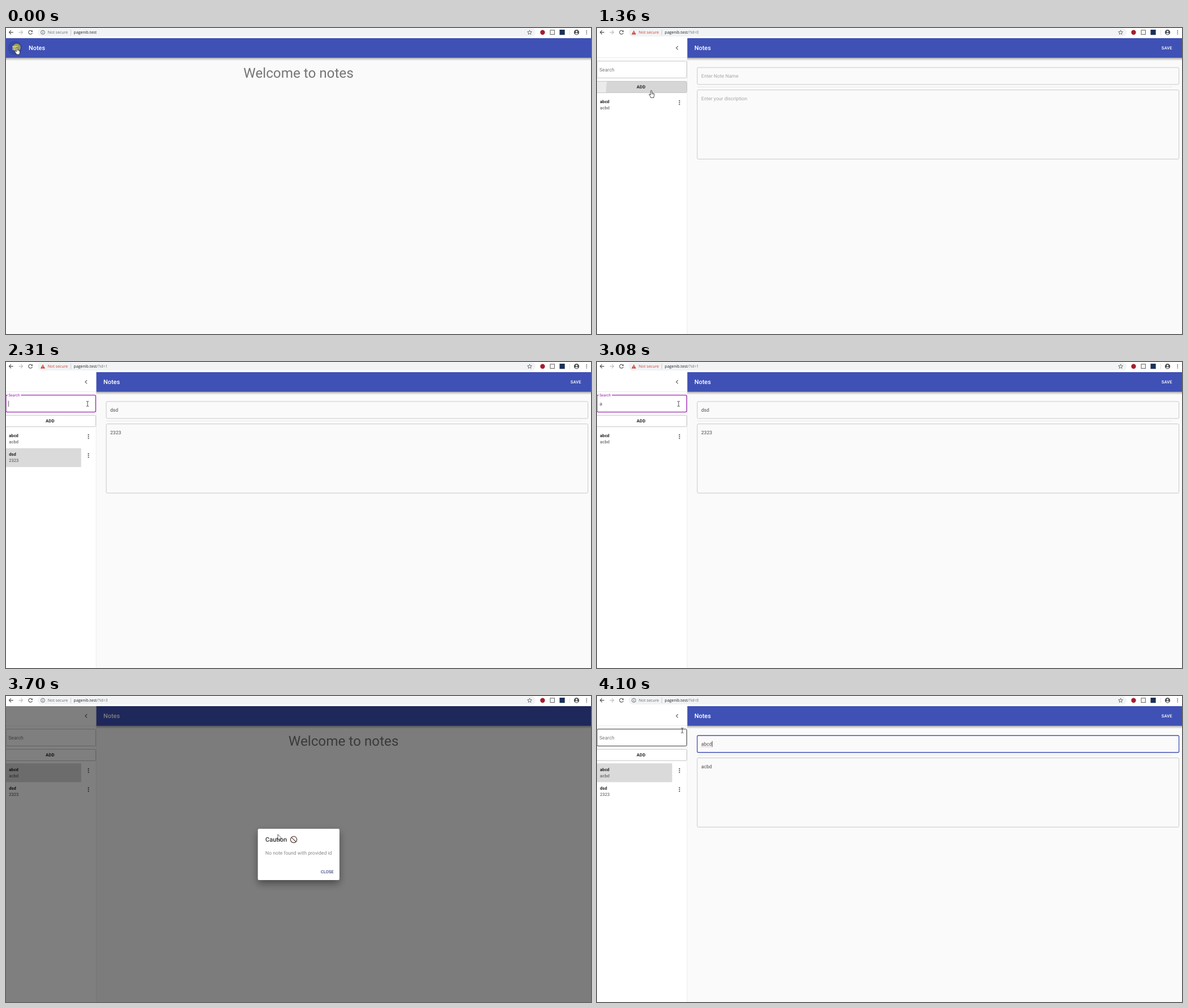
An HTML page for the animation above (4.25 s loop, 1033 by 542 pixels).

```html
<!DOCTYPE html>
<html lang="en">
<head>
<meta charset="utf-8">
<title>Notes</title>
<style>
html, body { margin: 0; width: 100%; height: 100%; overflow: hidden; background: #fafafa; }
svg { display: block; width: 1033px; height: 542px; font-family: Roboto, Arial, sans-serif; text-rendering: geometricPrecision; }
.ui { font-family: "Open Sans", "Noto Sans", sans-serif; }
</style>
</head>
<body>
<svg id="stage" viewBox="0 0 1033 542"></svg>
<script>
const LOOP = 4250;
const HOST = 'pagenib.test';
const BODY = 8.65;
const stage = document.getElementById('stage');
const pen = document.createElement('canvas').getContext('2d');

const hand = (x, y) => ({ kind: 'hand', x, y });
const beam = (x, y) => ({ kind: 'beam', x, y });
const arrow = (x, y) => ({ kind: 'arrow', x, y });

const abcd = ['abcd', 'acbd'];
const dsd = ['dsd', '2323'];
const open = { drawer: 1, titleX: 172, welcomeX: 596 };
const closed = { drawer: 0, titleX: 40, welcomeX: 516.5 };
const blank = { form: true, name: '', desc: '', focus: '', sel: -1 };

const initial = {
  ...closed, form: false, name: '', desc: '', focus: '', red: false, path: '',
  notes: [], sel: -1, query: '', searchHover: false, cursor: hand(19.5, 34.5),
  tap: true, addHover: false, addRipple: 0, dialog: 0, closeHover: false,
  closeRipple: 0, loading: false, caret: true, spell: false
};

// Each step changes only what differs from the step before.
const steps = [
  [0, {}],
  [70, { drawer: 0.6, titleX: 100, welcomeX: 560, tap: false }],
  [150, { ...open, cursor: arrow(35, 58) }],
  [230, { cursor: arrow(72, 90) }],
  [310, { cursor: hand(96, 111), addHover: true }],
  [380, { ...blank, addRipple: 60 }],
  [460, { cursor: beam(240, 92), addHover: false, addRipple: 0 }],
  [540, { focus: 'name' }],
  [630, { name: 'a', red: true }],
  [710, { name: 'abc' }],
  [790, { name: 'abcd', cursor: beam(260, 140) }],
  [870, { focus: 'desc', desc: 'ac' }],
  [950, { desc: 'acbd', cursor: hand(1006, 34) }],
  [1030, { path: '/?id=0', notes: [abcd], sel: 0, focus: '' }],
  [1110, { cursor: arrow(330, 140) }],
  [1200, { cursor: hand(96, 111), addHover: true }],
  [1280, { ...blank, addRipple: 42 }],
  [1360, { addRipple: 80 }],
  [1450, { cursor: beam(240, 88), addHover: false, addRipple: 0 }],
  [1530, { focus: 'name' }],
  [1680, { name: 'd' }],
  [1760, { name: 'dsd', cursor: beam(250, 135) }],
  [1840, { focus: 'desc', desc: '2' }],
  [1910, { desc: '2323' }],
  [1990, { cursor: hand(1006, 34) }],
  [2070, { path: '/?id=1', notes: [abcd, dsd], sel: 1, focus: '' }],
  [2140, { cursor: arrow(330, 120) }],
  [2220, { cursor: beam(144, 74), searchHover: true }],
  [2310, { focus: 'search', searchHover: false }],
  [2390, { caret: false }],
  [2470, { caret: true }],
  [2640, { query: 'd' }],
  [2720, { query: 'ds' }],
  [2790, { query: 'dsd' }],
  [2860, { query: 'ds' }],
  [2930, { query: 'd' }],
  [3080, { query: 'a', caret: false }],
  [3250, { cursor: beam(218.5, 11), focus: '' }],
  [3320, { path: '/?id=3' }],
  [3400, { ...closed, form: false, query: '', red: false, loading: true, sel: 0 }],
  [3480, { drawer: 0.774, titleX: 114, welcomeX: 568.5, dialog: 0.7 }],
  [3560, { ...open, dialog: 1, loading: false }],
  [3630, { cursor: arrow(330, 120) }],
  [3700, { cursor: arrow(480, 245) }],
  [3770, { cursor: hand(565, 312), closeHover: true }],
  [3860, { closeRipple: 4 }],
  [3950, { path: '/?id=0', form: true, name: 'abcd', desc: 'acbd', focus: 'name',
           caret: true, spell: true, dialog: 0.52, closeRipple: 8 }],
  [4040, { dialog: 0, cursor: arrow(310, 170) }],
  [4100, { cursor: beam(150.5, 61), searchHover: true }]
];

let last = initial;
const scenes = steps.map(([at, change]) => ({ at, state: last = { ...last, ...change } }));

const text = (x, y, size, fill, str, extra = '') =>
  `<text x="${x}" y="${y}" font-size="${size}" fill="${fill}" ${extra}>${str}</text>`;
const rect = (x, y, w, h, fill, extra = '') =>
  `<rect x="${x}" y="${y}" width="${w}" height="${h}" fill="${fill}" ${extra}/>`;
const circle = (x, y, r, fill, extra = '') =>
  `<circle cx="${x}" cy="${y}" r="${r}" fill="${fill}" ${extra}/>`;
const path = (d, stroke, width = 1, fill = 'none', extra = '') =>
  `<path d="${d}" stroke="${stroke}" stroke-width="${width}" fill="${fill}" ${extra}/>`;
const dots = (x, y, gap, r, fill) =>
  [-gap, 0, gap].map(dy => circle(x, y + dy, r, fill)).join('');
const medium = 'font-weight="500"';
const bold = 'font-weight="700"';
const middle = 'text-anchor="middle"';

function textWidth(str) {
  pen.font = `${BODY * 10}px Roboto, Arial, sans-serif`;
  return pen.measureText(str).width / 10;
}

const caretAt = (x, y) => rect(x, y - 8.6, 0.7, 10.6, '#222');

function toolbar(s) {
  const ink = '#4d5156';
  const secure = s.red
    ? path('M65 4.2L69 11.4H61Z', 'none', 0, '#d23f31') + rect(64.6, 6.6, 0.8, 2.4, '#fff') + rect(64.6, 9.7, 0.8, 0.8, '#fff')
    : circle(65, 7.7, 3.5, 'none', `stroke="${ink}" stroke-width=".8"`) + rect(64.6, 7.1, 0.8, 2.6, ink) + rect(64.6, 5.5, 0.8, 0.9, ink);
  return `<g class="ui">` +
    rect(0, 0, 1033, 18, '#fff') +
    rect(56, 0.5, 879, 14.5, '#f1f3f4', 'rx="7.2"') +
    path('M12.7 7.6H5.6M8.9 4.2L5.5 7.6L8.9 11', ink, 1.1) +
    path('M22.4 7.6H29.5M26.2 4.2L29.6 7.6L26.2 11', '#bcbfc2', 1.1) +
    path('M46 5.6A3.4 3.4 0 1 0 46.5 8.6', ink, 1.1) +
    path('M46.9 3.9V7H43.8Z', 'none', 0, ink) +
    secure +
    text(73.8, 10.2, 7, s.red ? '#d23f31' : '#666a6e', 'Not secure') +
    rect(114, 3, 0.7, 9.5, '#b5b8bb') +
    text(119.6, 10.2, 7, '#202124', `${HOST}<tspan fill="#6b6f73">${s.path}</tspan>`) +
    path('M924.6 3.9L925.7 6.5L928.5 6.7L926.4 8.5L927 11.2L924.6 9.8L922.2 11.2L922.8 8.5L920.7 6.7L923.5 6.5Z', ink, 0.8) +
    circle(947.5, 7.7, 4.2, '#a51d2d') +
    rect(961, 3.8, 7.6, 7.6, '#f4f4f4', 'stroke="#555" stroke-width=".9"') +
    rect(977.5, 3, 9.2, 9.2, s.loading ? '#e8e9ea' : '#1b3157') +
    rect(995, 3, 0.7, 9.5, '#d0d3d6') +
    circle(1007.5, 7.7, 4.7, ink) + circle(1007.5, 6.2, 1.5, '#fff') +
    path('M1004.7 10.3Q1007.5 7.4 1010.3 10.3Q1007.5 12.6 1004.7 10.3Z', 'none', 0, '#fff') +
    dots(1025.2, 7.7, 2.8, 0.85, ink) + '</g>';
}

function header(s) {
  let out = rect(0, 50, 1033, 8, 'url(#shade)') + rect(0, 17.5, 1033, 35.2, '#3f51b5');
  if (!s.drawer) {
    if (s.tap) out += circle(16, 35.3, 12.5, 'rgba(0,0,0,.1)');
    out += path('M11.2 32.6H20.8M11.2 35.3H20.8M11.2 38H20.8', '#fff', 1.1);
    if (s.tap) out += circle(19, 34.5, 6.8, 'rgba(225,220,40,.6)');
  }
  out += text(s.titleX, 39.1, 10.9, '#fff', 'Notes', medium);
  if (s.form) out += text(996.8, 37.9, 7.53, '#fff', 'SAVE', `${medium} letter-spacing=".1"`);
  return out;
}

function field(y, h, value, hint, focused, s) {
  const base = y + 18.3;
  let out = rect(177, y, 850.6, h, 'none', focused
    ? 'rx="2" stroke="#3f51b5" stroke-width="1.3"'
    : 'rx="2" stroke="#c3c3c3" stroke-width=".9"');
  out += text(184, base, BODY, value ? '#4a4a4a' : '#a6a6a6', value || hint);
  if (focused) {
    if (s.spell) out += path(`M184 ${base + 1.6}h${textWidth(value)}`, '#b66', 0.7, 'none', 'stroke-dasharray="1 .7"');
    out += caretAt(184.2 + textWidth(value), base);
  }
  return out;
}

function content(s) {
  if (!s.form) return text(s.welcomeX, 87.6, 24.22, '#757575', 'Welcome to notes', middle);
  return field(70, 30, s.name, 'Enter Note Name', s.focus === 'name', s) +
    rect(177, 104.2, 838, 0.7, '#e3e3e3') +
    field(109.7, 122.5, s.desc, 'Enter your discription', s.focus === 'desc', s);
}

function searchBox(s) {
  const on = s.focus === 'search';
  const raised = on || s.query;
  const stroke = on ? '#9c27b0' : s.searchHover ? '#222' : '#c0c0c0';
  let out = rect(0, 58.6, 158.4, 30, '#fff', `rx="2" stroke="${stroke}" stroke-width="${on ? 1.3 : 0.9}"`);
  if (raised) {
    out += rect(2.8, 57, 23.6, 3.4, '#fff') +
      text(4.2, 61.2, 6.6, on ? '#9c27b0' : '#757575', 'Search') +
      text(4.4, 77, BODY, '#4a4a4a', s.query);
    if (on && s.caret) out += caretAt(4.4 + textWidth(s.query), 77.2);
  } else out += text(4.2, 76.5, BODY, '#7b7b7b', 'Search');
  return out;
}

function addButton(s) {
  return rect(-1, 94.4, 159.5, 20.2, s.addHover ? '#ebebeb' : '#fff', 'rx="2"') +
    `<g clip-path="url(#addClip)">${circle(96, 111, s.addRipple, '#d6d6d6')}</g>` +
    rect(-1, 94.4, 159.5, 20.2, 'none', 'rx="2" stroke="#c0c0c0" stroke-width=".9"') +
    text(77.8, 107.2, 7.7, '#222', 'ADD', `${bold} ${middle} letter-spacing=".15"`);
}

function noteRow([title, body], i, selected) {
  const y = 119.2 + i * 33.5;
  return (selected ? rect(0, y, 132.7, 33.4, '#dadada') : '') +
    text(5.3, y + 13.6, 7.6, '#222', title, bold) +
    text(5.3, y + 24.3, 7.6, '#4a4a4a', body) +
    dots(145.6, y + 12.9, 3.2, 1.15, '#5a5a5a');
}

function drawer(s) {
  if (!s.drawer) return '';
  const rows = s.notes.filter(n => n[0].startsWith(s.query));
  return `<g transform="translate(${-159.3 * (1 - s.drawer)} 0)">` +
    rect(0, 17.5, 159.3, 525, '#fff') + rect(158.8, 17.5, 0.6, 525, '#dedede') +
    rect(0, 52, 158.8, 0.7, '#e4e4e4') +
    path('M143 32.2L139.9 35.3L143 38.4', '#555', 1.1) +
    searchBox(s) + addButton(s) +
    rows.map((n, i) => noteRow(n, i, !s.query && i === s.sel)).join('') + '</g>';
}

function dialog(s) {
  if (!s.dialog) return '';
  return rect(0, 17.5, 1033, 525, '#000', `opacity="${s.dialog / 2}"`) +
    `<g opacity="${s.dialog}">` +
    rect(444.8, 235.2, 144, 90.8, '#fff', 'rx="2" filter="url(#lift)"') +
    text(458, 258.3, 11, '#333', 'Caution', medium) +
    circle(508, 254.3, 5.6, 'none', 'stroke="#59463d" stroke-width="1.3"') +
    path('M504.1 250.4L511.9 258.2', '#59463d', 1.2) +
    text(458, 281.2, BODY, '#868686', 'No note found with provided id') +
    (s.closeHover ? rect(549.5, 302, 35.5, 18.5, 'rgba(63,81,181,.1)', 'rx="2"') : '') +
    circle(564, 312, s.closeRipple, 'rgba(63,81,181,.28)') +
    text(555.8, 314.1, 7.53, '#3c4a7e', 'CLOSE', medium) + '</g>';
}

const shapes = {
  hand: path('M-1.2 .8Q-1.2 -.3 -.1 -.3Q1 -.3 1 .8V4.3Q2 3.7 2.6 4.7Q3.6 4.2 4 5.2Q5 4.9 5 6.2V8.6Q5 10 4.2 11V12.4H-1.2V11.2Q-3 9 -4 7Q-4.2 5.8 -3 6.1L-1.2 7.6Z', '#222', 0.8, '#fff') +
    path('M1 4.3V6.6M2.6 4.8V6.8M4 5.3V7', '#222', 0.5),
  beam: path('M-2.2 -4.4Q0 -4.6 0 -3.6Q0 -4.6 2.2 -4.4M0 -3.8V3.8M-2.2 4.4Q0 4.6 0 3.6Q0 4.6 2.2 4.4', '#222', 0.8),
  arrow: path('M0 0V10L2.3 7.9L3.9 11.4L5.3 10.8L3.8 7.4H7Z', '#222', 0.7, '#fff')
};

const defs = `<defs>
  <linearGradient id="shade" x1="0" y1="0" x2="0" y2="1">
    <stop offset=".3" stop-color="#000" stop-opacity=".32"/><stop offset="1" stop-color="#000" stop-opacity="0"/>
  </linearGradient>
  <clipPath id="addClip"><rect x="-1" y="94.4" width="159.5" height="20.2" rx="2"/></clipPath>
  <filter id="lift" x="-30%" y="-40%" width="160%" height="190%">
    <feDropShadow dx="0" dy="6" stdDeviation="7" flood-color="#000" flood-opacity=".4"/>
  </filter></defs>`;

function status(s) {
  if (!s.loading) return '';
  return rect(-1, 531.2, 343, 12, '#fff', 'stroke="#ccc" stroke-width=".6"') +
    text(-0.5, 539.4, 6.1, '#5f6368', `Waiting for ${HOST}...`, 'class="ui"');
}

function draw(s) {
  const { kind, x, y } = s.cursor;
  stage.innerHTML = defs + rect(0, 0, 1033, 542, '#fafafa') +
    content(s) + header(s) + drawer(s) + dialog(s) + toolbar(s) + status(s) +
    `<g transform="translate(${x} ${y})">${shapes[kind]}</g>`;
}

const start = performance.now();
let shown = null;

function tick() {
  const t = (performance.now() - start) % LOOP;
  const scene = scenes.filter(c => c.at <= t).pop();
  if (scene !== shown) draw((shown = scene).state);
  requestAnimationFrame(tick);
}
tick();
</script>
</body>
</html>
```
